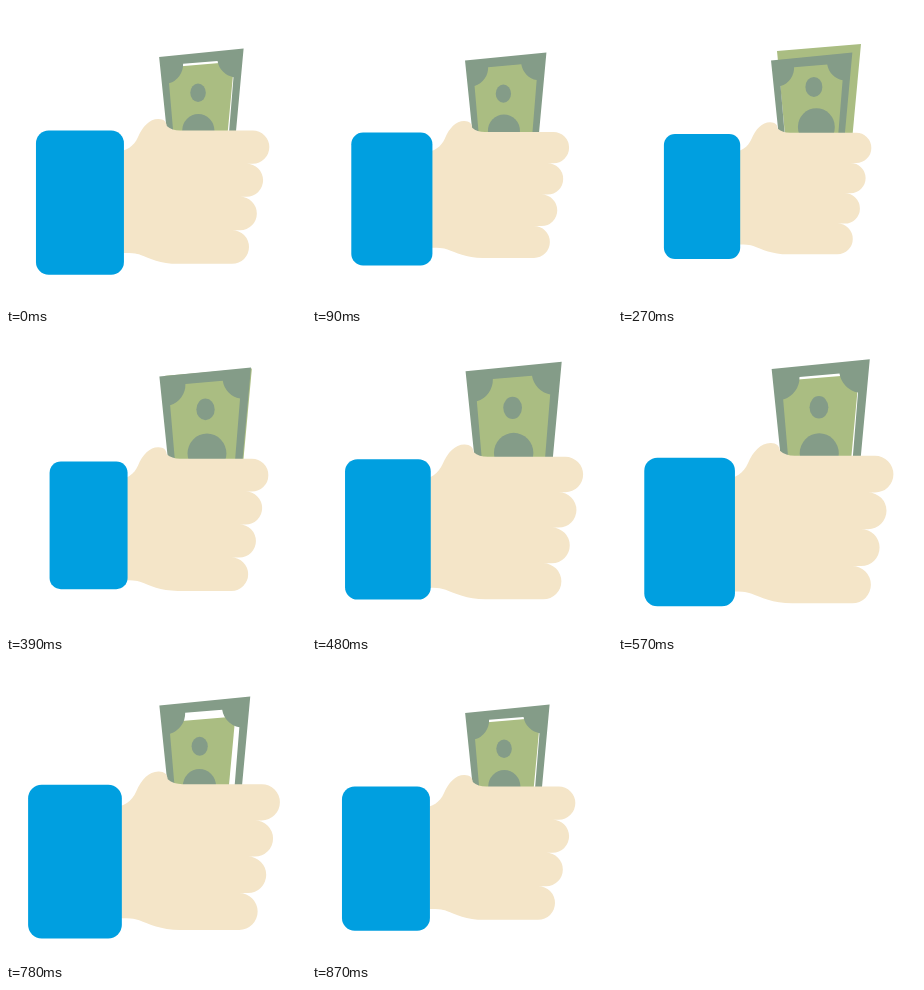
An HTML page for the animation above (0.9 s loop, 300 px wide and 300 px high).

```html
<!DOCTYPE html>
<html lang="en">
<head>
<meta charset="utf-8">
<title>Hand with cash</title>
<style>
  html, body { margin: 0; width: 100%; height: 100%; overflow: hidden; background: #fff; }
  svg { display: block; width: 100%; height: 100%; }
</style>
</head>
<body>
<!-- every layer pulses about the centre of the stage, one after the other -->
<svg viewBox="-150 -150 300 300">
  <path id="back" fill="#aabd82" d="M9-105L93-112L82.6 0H19Z"/>
  <ellipse id="seal" fill="#849c88" cx="48.5" cy="-29" rx="18.5" ry="19"/>
  <ellipse id="dot" fill="#849c88" cx="46.5" cy="-70" rx="8.6" ry="10.2"/>
  <path id="frame" fill="#849c88" fill-rule="evenodd"
    d="M3-95L84-103L74.5 0H12.8Z
       M18.5 0L12.5-69.7A19 19 0 0 0 26-88.4L59-91.2A19 19 0 0 0 74.3-75.5L68.2 0Z"/>
  <path id="hand" fill="#f4e5c8"
    d="M-36-4C-27-4-20-9-16.5-17C-12.3-27-5.5-34 2.4-33.7C7-33.5 9.5-31.5 9.8-27.3
       C13-24.5 17-23.2 22-23.2H88.2A15.1 15.1 0 0 1 88.2 7
       H82.5A15.1 15.1 0 0 1 82.5 37.2H76.7A15.2 15.2 0 0 1 76.7 67.6
       H69.4A15.35 15.35 0 0 1 69.4 98.3H20
       C4 98.3-6 93.2-14 90.2C-18 88.7-22 88.5-36 88.5Z"/>
  <rect id="cuff" fill="#009fe0" x="-103.7" y="-22" width="76" height="124.5" rx="11"/>
</svg>
<script>
const LOOP = 900, STEP = 30, CYCLE = LOOP - STEP, GROWTH = 0.234;

// smallest scale and the moment (ms) the layer starts to grow
const layers = [
  ["back", 0.84, 48],
  ["seal", 0.865, 105],
  ["dot", 0.888, 148],
  ["frame", 0.988, 234],
  ["hand", 1, 288],
  ["cuff", 1, 342]
].map(([id, size, delay]) => ({ el: document.getElementById(id), size, delay }));

const bezier = (a, b, u) => 3 * u * (1 - u) * (a * (1 - u) + b * u) + u ** 3;

// the CSS "ease" curve, solved by bisection
function ease(x) {
  let lo = 0, hi = 1;
  for (let i = 0; i < 24; i++) {
    const mid = (lo + hi) / 2;
    if (bezier(0.25, 0.25, mid) < x) lo = mid; else hi = mid;
  }
  return bezier(0.1, 1, lo);
}

// eased growth for half a cycle, then eased shrinking
function pulse(t) {
  const p = 2 * ((t + CYCLE) % CYCLE) / CYCLE;
  return p < 1 ? ease(p) : 1 - ease(p - 1);
}

function draw(ms) {
  const t = Math.floor((ms % LOOP) / STEP) * STEP;
  for (const { el, size, delay } of layers) {
    const s = size * (1 + GROWTH * pulse(t - delay));
    el.setAttribute("transform", `scale(${s.toFixed(4)})`);
  }
}

let start;
function tick(now) {
  start ??= now;
  draw(now - start);
  requestAnimationFrame(tick);
}
draw(0);
requestAnimationFrame(tick);
</script>
</body>
</html>
```
